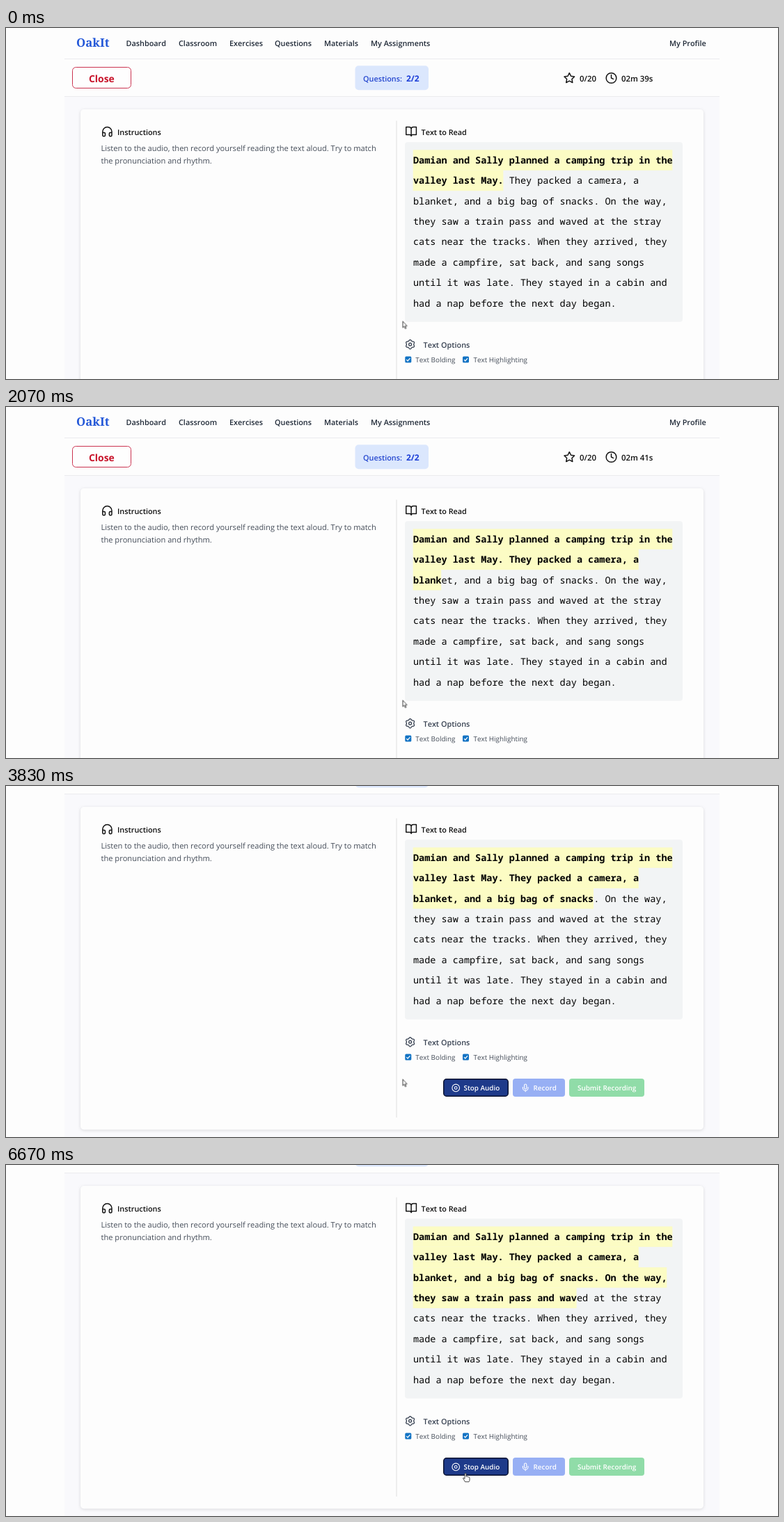
These frames come from a looping animation (1109 by 505 pixels, 6700 ms). An HTML page:

```html
<!DOCTYPE html>
<html lang="en">
<head>
<meta charset="utf-8">
<title>Reading exercise</title>
<style>
  html, body { margin: 0; width: 100%; height: 100%; overflow: hidden; background: #fdfdfd; }
  svg { display: block; }
  text { font: 400 11.1px "Open Sans", "Noto Sans", sans-serif; font-kerning: none; fill: #454d59; white-space: pre; text-rendering: geometricPrecision; }
  .semi { font-weight: 600; font-size: 10.85px; fill: #1f2937; }
  .dark { fill: #111; }
  .stat { font-size: 11.4px; fill: #111; }
  .brand { font: 700 16.8px "Noto Serif", serif; fill: #2458d8; }
  .close { font-weight: 700; font-size: 13.9px; fill: #c8142b; }
  .blue { fill: #2547cf; }
  .score { font-weight: 700; font-size: 12px; fill: #1d3fd8; }
  .small { font-size: 9.9px; }
  .btn { font-weight: 600; font-size: 9.9px; fill: #fff; }
  .story text { font: 400 13.5px "Noto Sans Mono", monospace; fill: #000; }
  .story .read { font-weight: 700; }
  .story rect { fill: #fcfcc4; }
  .icon { fill: none; stroke: #111; stroke-width: 2; stroke-linecap: round; stroke-linejoin: round; }
  .card { fill: #fdfdfd; filter: drop-shadow(0 1px 2px rgba(0, 0, 0, .13)); }

  #page { animation: scroll 6.7s linear infinite; }
  #cursor { animation: move 6.7s linear infinite; }
  #arrow { animation: hide 6.7s step-end infinite; }
  #hand { animation: show 6.7s step-end infinite; }

  @keyframes scroll {
    0% { transform: translateY(0); }
    43.28% { transform: translateY(0); animation-timing-function: ease-in-out; }
    49.25% { transform: translateY(-87px); animation-timing-function: step-end; }
    63.43% { transform: translateY(-88px); animation-timing-function: step-end; }
    73.58%, 100% { transform: translateY(-87px); }
  }
  @keyframes move {
    0% { transform: translate(569.5px, 421.5px); }
    91.04% { transform: translate(569.5px, 421.5px); animation-timing-function: ease-in-out; }
    97.76%, 100% { transform: translate(660px, 443px); }
  }
  @keyframes hide { 0% { opacity: 1; } 94.9%, 100% { opacity: 0; } }
  @keyframes show { 0% { opacity: 0; } 94.9%, 100% { opacity: 1; } }
</style>
</head>
<body>
<svg width="1109" height="505" viewBox="0 0 1109 505">
  <g id="page">
    <rect x="84" y="99" width="941" height="500" fill="#f9f9fc"/>
    <path d="M84 44.5H1025M84 98.5H1025" stroke="#ebebee"/>

    <text class="brand" x="101" y="27.3">OakIt</text>
    <g>
      <text class="semi" x="172.5" y="26">Dashboard</text>
      <text class="semi" x="248" y="26">Classroom</text>
      <text class="semi" x="321" y="26">Exercises</text>
      <text class="semi" x="386" y="26">Questions</text>
      <text class="semi" x="457" y="26">Materials</text>
      <text class="semi" x="524" y="26">My Assignments</text>
      <text class="semi" x="953" y="26">My Profile</text>
    </g>

    <rect x="95.5" y="56.5" width="84" height="30" rx="5" fill="#fefefe" stroke="#cb3350"/>
    <text class="close" x="119" y="78">Close</text>

    <rect x="501.5" y="54.3" width="105.5" height="35" rx="5" fill="#dbe7fd"/>
    <text class="semi blue" x="513" y="76.5">Questions:</text>
    <text class="score" x="575" y="76.8">2/2</text>

    <g class="icon" transform="translate(800.5 63.2) scale(.733)">
      <path d="M12 2l3.09 6.26 6.91 1-5 4.88 1.18 6.88L12 17.77l-6.18 3.25L7 14.14 2 9.27l6.91-1z"/>
    </g>
    <text class="semi stat" x="824" y="76.5">0/20</text>
    <g class="icon" transform="translate(860.7 63.2) scale(.733)">
      <circle cx="12" cy="12" r="10"/><path d="M12 6v6l4 2"/>
    </g>
    <text class="semi stat" id="timer" x="884" y="76.5">02m 39s</text>

    <rect class="card" x="107" y="117" width="895" height="464.5" rx="5"/>
    <path d="M561 133.5V564" stroke="#dedede"/>

    <g class="icon" transform="translate(136.6 140.3) scale(.733)">
      <path d="M3 14h3a2 2 0 0 1 2 2v3a2 2 0 0 1-2 2H5a2 2 0 0 1-2-2v-7a9 9 0 0 1 18 0v7a2 2 0 0 1-2 2h-1a2 2 0 0 1-2-2v-3a2 2 0 0 1 2-2h3"/>
    </g>
    <text class="semi dark" x="160" y="153.5">Instructions</text>
    <text x="136.5" y="177.4">Listen to the audio, then record yourself reading the text aloud. Try to match</text>
    <text x="136.5" y="195">the pronunciation and rhythm.</text>

    <g class="icon" transform="translate(573.3 140.2) scale(.733)">
      <path d="M2 3h6a4 4 0 0 1 4 4v14a3 3 0 0 0-3-3H2zM22 3h-6a4 4 0 0 0-4 4v14a3 3 0 0 1 3-3h7z"/>
    </g>
    <text class="semi dark" x="596.5" y="153.5">Text to Read</text>
    <rect x="573" y="164.3" width="399" height="258.4" rx="4" fill="#f2f4f5"/>
    <g class="story" id="story"></g>

    <g class="icon" transform="translate(580.6 455.2) scale(.65)" style="stroke:#374151">
      <path id="gear"/><circle r="3"/>
    </g>
    <text class="semi" x="599.5" y="459.5" style="fill:#374151">Text Options</text>
    <g id="check">
      <rect x="573.3" y="472.6" width="9" height="9" rx="1.5" fill="#1273c4"/>
      <path d="M575.3 477.2l1.8 1.8 3.3-3.8" fill="none" stroke="#fff" stroke-width="1.2"/>
    </g>
    <use href="#check" x="82.7"/>
    <text class="small" x="588.3" y="481.4">Text Bolding</text>
    <text class="small" x="671.5" y="481.4">Text Highlighting</text>

    <rect x="628.75" y="508.75" width="92.5" height="24.5" rx="4" fill="#1e3a8a" stroke="#0b1230" stroke-width="1.5"/>
    <g class="icon" transform="translate(646.2 521.4) scale(.53)" style="stroke:#fff">
      <circle r="10"/><circle r="3.5"/>
    </g>
    <text class="btn" x="657.5" y="525.2">Stop Audio</text>

    <rect x="728" y="508" width="75" height="26" rx="4" fill="#97aff4"/>
    <g class="icon" transform="translate(739.7 514.9) scale(.54)" style="stroke:#fff">
      <rect x="9" y="2" width="6" height="13" rx="3"/><path d="M19 10v2a7 7 0 0 1-14 0v-2M12 19v3"/>
    </g>
    <text class="btn" x="757.5" y="525.2">Record</text>

    <rect x="809" y="508" width="108" height="26" rx="4" fill="#90dca8"/>
    <text class="btn" x="821" y="525.2">Submit Recording</text>
  </g>

  <g id="cursor" fill="#fff" stroke="#333" stroke-width=".9" stroke-linejoin="round">
    <path id="arrow" d="M.5.5V9.6l2-1.9 1.5 3.4 1.4-.6-1.5-3.3h2.7z"/>
    <path id="hand" d="M-1 1.2Q0-.4 1 1.2V5.2Q2.2 4.5 2.8 5.6 4 5 4.5 6.2 6 5.8 6 7.4V10Q6 11.5 5 12.8H-.6Q-1.2 11.2-2.8 9.2-4 7.4-2.8 7L-1 8.4z"/>
  </g>
</svg>

<script>
const STORY = [
  'Damian and Sally planned a camping trip in the',
  'valley last May. They packed a camera, a',
  'blanket, and a big bag of snacks. On the way,',
  'they saw a train pass and waved at the stray',
  'cats near the tracks. When they arrived, they',
  'made a campfire, sat back, and sang songs',
  'until it was late. They stayed in a cabin and',
  'had a nap before the next day began.'
];
const LOOP = 6700, LEFT = 585, CHAR = 8.1, PITCH = 29.4;

// [ms, characters read], with pauses at punctuation
const PACE = [
  [0, 63], [200, 63], [1370, 84], [1430, 85], [1650, 86], [2200, 96], [2420, 96],
  [2770, 101], [3830, 120], [3890, 121], [4310, 121], [4530, 125], [5830, 148], [6670, 163], [6700, 163]
];

const byId = id => document.getElementById(id);

function add(parent, name, attrs = {}) {
  const el = document.createElementNS('http://www.w3.org/2000/svg', name);
  for (const key in attrs) el.setAttribute(key, attrs[key]);
  return parent.appendChild(el);
}

let offset = 0;
const lines = STORY.map((words, i) => {
  const mark = add(byId('story'), 'rect', { x: LEFT - .3, y: 175.4 + i * PITCH, height: PITCH, width: 0 });
  const text = add(byId('story'), 'text', { x: LEFT, y: 194.8 + i * PITCH });
  const line = { words, mark, start: offset, read: add(text, 'tspan', { class: 'read' }), rest: add(text, 'tspan') };
  offset += words.length + 1;
  return line;
});

const rim = Array.from({ length: 48 }, (_, i) => {
  const a = i * Math.PI / 24, r = 9 + 1.2 * Math.cos(6 * a);
  return `${(r * Math.sin(a)).toFixed(2)} ${(-r * Math.cos(a)).toFixed(2)}`;
});
byId('gear').setAttribute('d', `M${rim.join('L')}Z`);

function charsRead(t) {
  const i = PACE.findIndex(([end]) => end > t);
  const [t0, n0] = PACE[i - 1], [t1, n1] = PACE[i];
  return Math.round(n0 + (n1 - n0) * (t - t0) / (t1 - t0));
}

let shown = -1;
function showRead(count) {
  if (count === shown) return;
  shown = count;
  for (const { words, mark, start, read, rest } of lines) {
    const n = Math.max(0, Math.min(words.length, count - start));
    mark.setAttribute('width', n * CHAR);
    read.textContent = words.slice(0, n);
    rest.textContent = words.slice(n);
  }
}

const clock = byId('page').getAnimations()[0];
function draw() {
  const t = (clock ? clock.currentTime || 0 : performance.now()) % LOOP;
  showRead(charsRead(t));
  byId('timer').textContent = `02m ${39 + Math.floor((t + 430) / 1000)}s`;
  requestAnimationFrame(draw);
}
draw();
</script>
</body>
</html>
```
